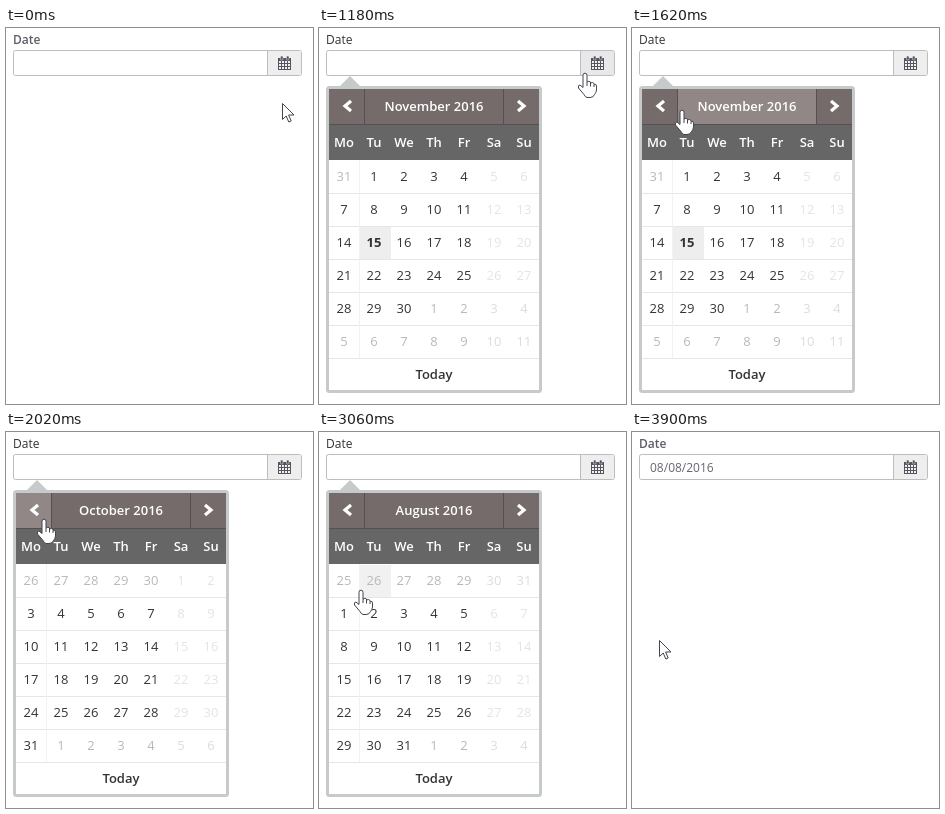
An HTML page for the animation above (8280 ms loop, 307x376 px).

```html
<!DOCTYPE html>
<html lang="en">
<head>
<meta charset="utf-8">
<title>Date picker</title>
<style>
  html, body { margin: 0; width: 100%; height: 100%; overflow: hidden; background: #fff; }
  svg { display: block; width: 100vw; height: 100vh; font: 13px "Open Sans", sans-serif; }
  .mid { text-anchor: middle; }
  .semi { font-weight: 600; }
  .crisp { shape-rendering: crispEdges; }
  .field { font-size: 12px; fill: #666670; }
  .cursor { fill: #fff; stroke: #44444c; stroke-linejoin: round; }
</style>
</head>
<body>
<svg id="stage" viewBox="0 0 307 376"></svg>
<script>
const LOOP = 8280, OPEN = 880, CLOSE = 3880;
const MONTHS = [[0, 10, "November"], [2020, 9, "October"], [2360, 8, "September"], [2680, 7, "August"]];
// time, x, y of the pointer's hot spot
const PATH = [
  [0, 276, 75], [420, 276, 75], [700, 284, 43], [1160, 284, 43],
  [1320, 139, 65], [1400, 78, 76], [1480, 52, 82], [1600, 52, 82],
  [1740, 38, 88], [2820, 37, 88], [2940, 38, 120], [3060, 42, 159],
  [3180, 35, 190], [3300, 27, 208], [LOOP, 27, 208]
];
const TITLE = [46, 61, 138, 35], PREV = [10, 61, 35, 35], NEXT = [185, 61, 35, 35];
const ADDON = [262, 22, 34, 26], POPUP = [7, 58, 216, 307];

const stage = document.getElementById("stage");
function add(parent, tag, attrs = {}, content = "") {
  const node = document.createElementNS("http://www.w3.org/2000/svg", tag);
  for (const key in attrs) node.setAttribute(key, attrs[key]);
  node.textContent = content;
  return parent.appendChild(node);
}
const box = (parent, [x, y, width, height], fill) =>
  add(parent, "rect", { x, y, width, height, fill, class: "crisp" });
const text = (parent, x, y, content, cls = "", fill = "#333") =>
  add(parent, "text", { x, y, class: cls, fill }, content);
const path = (parent, d, attrs) => add(parent, "path", { d, ...attrs });
const inside = (x, y, [left, top, w, h]) => x >= left && x < left + w && y >= top && y < top + h;
const show = (node, on) => node.setAttribute("visibility", on ? "visible" : "hidden");

const label = text(stage, 7, 16, "Date", "field");
add(stage, "rect", { x: 7.5, y: 22.5, width: 288, height: 25, rx: 2, fill: "#fff", stroke: "#bdbdbd" });
const addon = box(stage, [262, 23, 33, 24], "#eee");
box(stage, [261, 23, 1, 24], "#bdbdbd");
const value = text(stage, 18, 40, "08/08/2016", "field");

// calendar icon
const icon = add(stage, "g");
path(icon, "M272 30H285V42H272Z", { fill: "#555560" });
for (let row = 0; row < 3; row++)
  for (let col = 0; col < 4; col++)
    box(icon, [273 + col * 3, 33 + row * 3, 2, 2], "#f2f2f2");
for (const x of [275, 281])
  add(icon, "rect", { x: x - .5, y: 28, width: 2.5, height: 4, rx: 1, fill: "#555560", stroke: "#eee", "stroke-width": .5 });

const popup = add(stage, "g");
path(popup, "M20 59L31 48L42 59Z", { fill: "#c6caca" });
add(popup, "rect", { x: 8.5, y: 59.5, width: 213, height: 304, rx: 2, fill: "#fff", stroke: "#c6caca", "stroke-width": 3 });
box(popup, [10, 61, 210, 36], "#555051");
const buttons = [TITLE, PREV, NEXT].map(area => ({ area, node: box(popup, area, "#766b6b") }));
const title = text(popup, 115, 83, "", "mid semi", "#fff");
for (const d of ["M32 73L26 78L32 83", "M199 73L205 78L199 83"])
  path(popup, d, { fill: "none", stroke: "#fff", "stroke-width": 3.2 });
box(popup, [10, 97, 210, 35], "#666");
["Mo", "Tu", "We", "Th", "Fr", "Sa", "Su"].forEach((day, i) =>
  text(popup, 25 + i * 30, 119, day, "mid semi", "#fff"));

const cells = [];
for (let i = 0; i < 42; i++) {
  const x = 10 + i % 7 * 30, y = 132 + Math.floor(i / 7) * 33;
  const area = [x, y, 30, 33];
  cells.push({ area, back: box(popup, [x + (i % 7 ? 1 : 0), y + 1, 31, 32], "none"), node: text(popup, x + 15, y + 21, "", "mid") });
}
for (let row = 1; row <= 6; row++) box(popup, [10, 132 + row * 33, 210, 1], "#e6e6e6");
box(popup, [40, 132, 1, 198], "#f2f2f2");
text(popup, 115, 351, "Today", "mid semi");

const arrow = path(stage, "M.5 .5V16.5L4.2 13L6.8 19L9.2 18L6.6 12H12Z", { class: "cursor" });
const hand = path(stage,
  "M-2 1.2Q-2-.8 0-.8T2 1.2V8Q4 6.5 5.5 8V9Q7.5 7.7 9 9.5V10.3Q11.5 9.8 11.5 12V16Q11 19 9.5 20.5Q8.5 23.5 5 23.5H2Q0 23 -1 20.5L-6.5 14Q-7.3 11 -5 11L-2 13.5ZM2 8V12M5.5 9V12.5M9 10.5V13",
  { class: "cursor" });

function pointer(t) {
  const i = PATH.findIndex(point => point[0] > t);
  const [t0, x0, y0] = PATH[i - 1], [t1, x1, y1] = PATH[i];
  const p = (t - t0) / (t1 - t0);
  return [x0 + (x1 - x0) * p, y0 + (y1 - y0) * p];
}

function drawMonth(month, name, x, y) {
  title.textContent = name + " 2016";
  const first = (new Date(Date.UTC(2016, month, 1)).getUTCDay() + 6) % 7 || 7;
  cells.forEach(({ area, back, node }, i) => {
    const date = new Date(Date.UTC(2016, month, 1 + i - first));
    const current = date.getUTCMonth() === month, weekend = i % 7 > 4;
    const today = date.getUTCMonth() === 10 && date.getUTCDate() === 15;
    node.textContent = date.getUTCDate();
    node.setAttribute("font-weight", today ? 700 : 400);
    node.setAttribute("fill", weekend ? (current ? "#e4e4e4" : "#dcdcdc") : current ? "#333" : "#b8b8b8");
    const hover = inside(x, y, area) && !weekend;
    back.setAttribute("fill", today ? "#eee" : hover ? "#f1f1f1" : "none");
  });
}

function draw(now) {
  const t = Math.floor(now % LOOP / 20) * 20;
  const [x, y] = pointer(t);
  const open = t >= OPEN && t < CLOSE;
  const onAddon = inside(x, y, ADDON);
  const pointing = onAddon || open && inside(x, y, POPUP);

  show(popup, open);
  show(value, t >= CLOSE);
  label.style.fontWeight = open ? 400 : 600;
  label.style.fill = open ? "#333" : "#5e5e68";
  addon.setAttribute("fill", onAddon ? "#e8e8ea" : "#eee");
  for (const { area, node } of buttons)
    node.setAttribute("fill", inside(x, y, area) ? "#928787" : "#766b6b");
  if (open) {
    const [, month, name] = MONTHS.filter(entry => entry[0] <= t).pop();
    drawMonth(month, name, x, y);
  }
  for (const node of [arrow, hand])
    node.setAttribute("transform", `translate(${Math.round(x)} ${Math.round(y)})`);
  show(hand, pointing);
  show(arrow, !pointing);
}

const start = performance.now();
function tick() {
  draw(performance.now() - start);
  requestAnimationFrame(tick);
}
tick();
</script>
</body>
</html>
```
